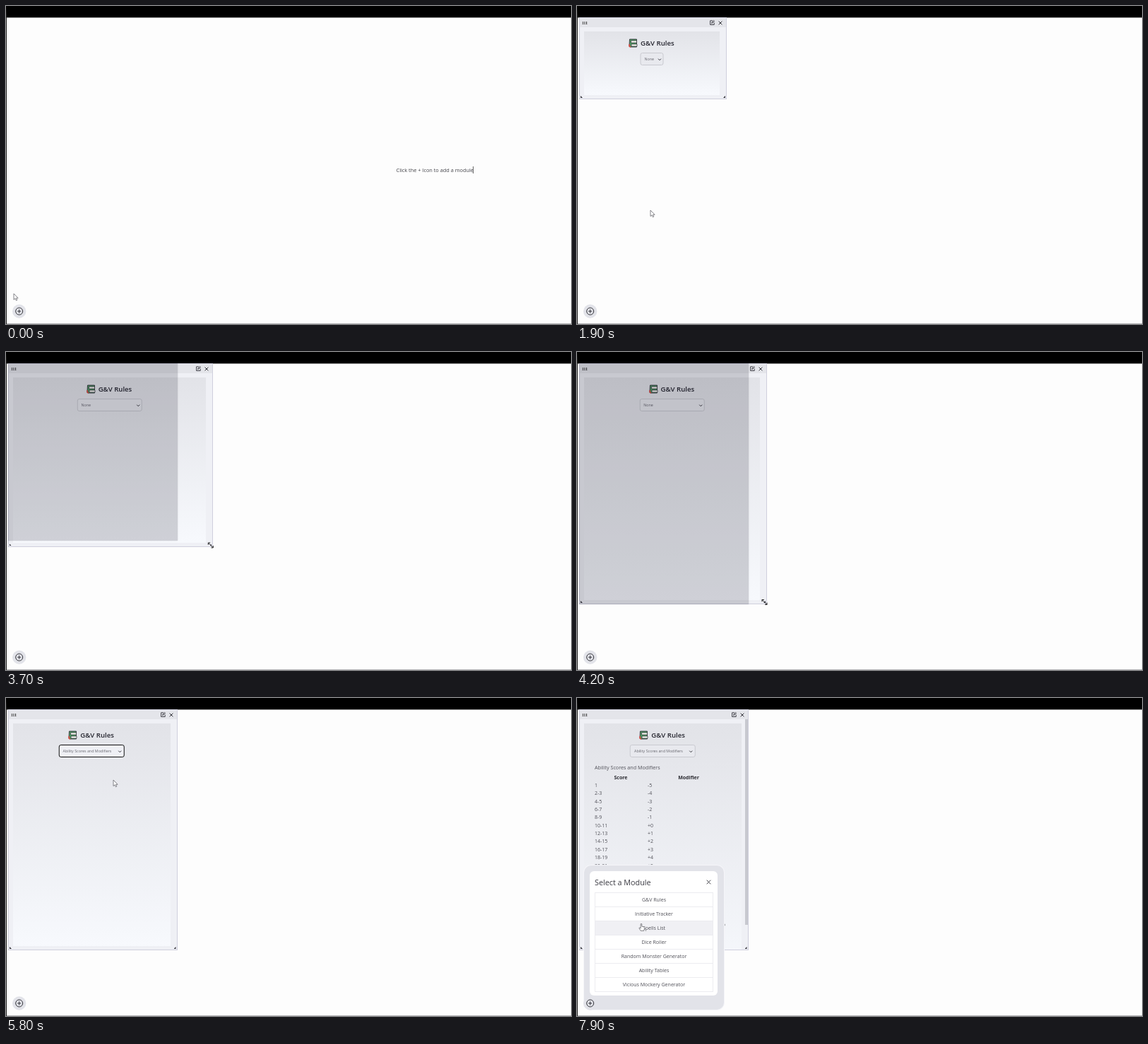
Animation of 800 by 450 pixels, one loop 8000 ms. Source, as an HTML page:

```html
<!DOCTYPE html>
<html lang="en">
<head>
<meta charset="utf-8">
<title>Module board</title>
<style>
html, body { margin: 0; width: 100%; height: 100%; overflow: hidden; background: #fdfdfd; }
#stage { position: absolute; left: 0; top: 0; width: 800px; height: 450px; overflow: hidden;
  background: #fdfdfd; font: 7px/12px "Open Sans", "Noto Sans", sans-serif; color: #505058; }
#stage, #stage * { box-sizing: border-box; }
#stage div, #stage svg { position: absolute; }
[hidden] { display: none !important; }
svg { overflow: visible; fill: none; stroke: #33333a; }
.text { white-space: nowrap; }

#frame { inset: 0; border: solid #222; border-width: 16px 0 0 1px; border-top-color: #000;
  box-shadow: inset 0 1px #999, inset 0 -1px #b5b5b8; }
#prompt { left: 552.5px; top: 226px; font-size: 7.35px; color: #44444a; }
#caret { left: 661px; top: 227px; width: 1px; height: 10px; background: #666; }

#win { left: 3px; top: 16px; border: 1px solid #cfcfdd; background: #eff0f5; overflow: hidden; }
#bar { left: 0; top: 0; right: 0; height: 13px; background: #e4e5ea; }
#grip { left: 3px; top: 4.5px; width: 8px; height: 4px;
  background: radial-gradient(circle, #444 0.7px, transparent 1px) 0 0 / 2.6px 2.2px; }
#edit { right: 16px; top: 3px; }
#close { right: 5px; top: 4px; }
#panel { left: 6px; right: 9px; top: 19px; bottom: 5px; background: linear-gradient(#e2e3e8, #f7f9fd); }
#panel.long { bottom: -45px; }
#title { left: 50%; top: 9px; width: 66px; height: 16px; margin-left: -33px; padding-left: 17px;
  font: 600 9.6px/16px "Open Sans", "Noto Sans", sans-serif; color: #24242e; }
#books { left: 0; top: 1px; }
#select { left: 50%; top: 30px; height: 18px; transform: translateX(-50%); padding-left: 5px;
  border: 1px solid #c9cad0; border-radius: 3px; background: #e8e9ee; color: #66666e;
  font-size: 5.35px; line-height: 17px; }
#select.focus { border: 1.5px solid #111; background: #eff0f5; padding-left: 4.5px; }
#arrow { right: 2.5px; top: 6.5px; }
#table { left: 15px; top: 0; }
#thumb { left: 234px; top: 13px; width: 4px; height: 291px; background: #c7c8cf; }
.corner { bottom: 1px; width: 3px; height: 3px; background: #33333b; }
#left { left: 1px; clip-path: polygon(0 0, 100% 100%, 0 100%); }
#right { right: 1px; clip-path: polygon(100% 0, 100% 100%, 0 100%); }
#ghost { left: 3px; top: 16px; width: 240px; background: rgba(8, 8, 24, 0.17);
  box-shadow: 0 0 2px rgba(0, 0, 0, 0.12); }

#list { left: 75px; top: 84px; width: 92px; height: 229px; background: #fff; border: 1px solid #888; font-size: 5.2px; }
#list div { width: 90px; height: 11.35px; line-height: 11px; padding-left: 4px; }
#list .on { background: #1e70d0; color: #fff; }

#menu { left: 10px; top: 237px; width: 198px; height: 204px; border-radius: 10px; background: #e2e3e9;
  box-shadow: 0 0 0 1px #f5f5f9; }
#card { left: 8px; top: 8px; width: 181px; height: 176px; border-radius: 6px; background: #fff; }
#head { left: 7px; top: 8px; font-size: 10.8px; line-height: 15px; color: #3a3a42; }
#dismiss { left: 164.5px; top: 11.5px; }
#items div { left: 7px; width: 168px; height: 21px; border: 1px solid #ececf0;
  line-height: 19px; text-align: center; font-size: 7.05px; }
#items .on { background: #f0f0f4; }
#plus { left: 9px; top: 422px; }
#cursor path { fill: #fff; stroke: #66666d; stroke-width: .8; }
#cursor #resize { fill: none; stroke: #222; stroke-width: 1; }
</style>
</head>
<body>
<div id="stage">
  <div id="frame"></div>
  <div class="text" id="prompt">Click the + Icon to add a module</div>
  <div id="caret"></div>

  <div id="win">
    <div id="panel">
      <div class="text" id="title">
        <svg id="books" width="13" height="13">
          <path d="M1.5 1h10v11h-9q-1.500 0-1.500-1.500z" fill="#4f9a62" stroke-width=".9"/>
          <path d="M3.500 3h8v3h-8zM4 8h8v3H4z" fill="#f4f6ee" stroke-width=".7"/>
          <path d="M1.200 8v3l1.800 1" stroke="#d8473d" stroke-width="1.600"/>
        </svg>G&amp;V Rules</div>
      <div class="text" id="select"><span id="value"></span>
        <svg id="arrow" width="5" height="4"><path d="M.5.7l2 2 2-2" stroke-width="1"/></svg></div>
      <div id="table"></div>
    </div>
    <div id="bar">
      <div id="grip"></div>
      <svg id="edit" width="7" height="7"><path d="M4 .8H.6v5.700h5.600V3.500M2.500 4.600l.3-1.300L5.700.5l.8.8-2.800 2.900z" stroke-width=".9"/></svg>
      <svg id="close" width="6" height="6"><path d="M.6.6l4.800 4.800M5.400.6L.6 5.400"/></svg>
    </div>
    <div id="thumb"></div>
    <div class="corner" id="left"></div>
    <div class="corner" id="right"></div>
  </div>
  <div id="ghost"></div>
  <div id="list"></div>

  <div id="menu">
    <div id="card">
      <div class="text" id="head">Select a Module</div>
      <svg id="dismiss" width="7" height="7"><path d="M.7.7l5.600 5.600M6.300.7L.7 6.300" stroke-width=".9"/></svg>
      <div id="items"></div>
    </div>
  </div>
  <svg id="plus" width="20" height="20">
    <circle cx="9.700" cy="10" r="9.700" fill="#e2e3e9" stroke="none"/>
    <circle cx="9.700" cy="10" r="5"/>
    <path d="M7.200 10h5M9.700 7.500v5"/>
  </svg>

  <svg id="cursor" width="1" height="1">
    <path id="pointer" d="M0 0v8.600l2-1.800 1.400 3 1.400-.7-1.300-2.800h2.600z"/>
    <path id="hand" d="M-.8.8Q0-.6.8.8V4.200l3 .8q.9.4.7 1.600l-.7 3.800H-.8L-3 6.800q0-1.200 1-.8l1.200 1z"/>
    <path id="resize" d="M-2-2.500L5 4.500M-2 .3v-2.800H.8M5 1.700v2.800H2.200"/>
  </svg>
</div>
<script>
const LOOP = 8000, STEP = 100;
const ADDED = 1700, GRAB = 3200, RELEASE = 4200, FILLED = 6000, REOPENED = 7000;
const $ = id => document.getElementById(id);

// Stops of the mouse: time, x, y
const stops = [
  [0, 11, 407], [400, 17, 432], [800, 17, 432], [1600, 105, 290], [1900, 104, 289],
  [2700, 96, 62], [2950, 255, 142], [GRAB, 207, 128], [3400, 236, 140], [3800, 298, 297],
  [RELEASE, 264, 353], [5000, 160, 77], [5800, 152, 116], [6900, 19, 431], [7400, 19, 431], [7900, 91, 319]
];
const topic = "Ability Scores and Modifiers";
const modules = ["G&V Rules", "Initiative Tracker", "Spells List", "Dice Roller",
  "Random Monster Generator", "Ability Tables", "Vicious Mockery Generator"];
const topics = ["None", topic, "Ability Checks", "Actions in Combat", "Advantage", "Armor", "Conditions",
  "Cover", "Damage Types", "Death Saves", "Difficulty Classes", "Equipment", "Exhaustion", "Falling",
  "Languages", "Light and Vision", "Resting", "Saving Throws", "Travel Pace", "Weapons"];
const notes = ["To find a modifier without using the table,",
  "subtract ten from the score, then divide the result by two", "and round down. Add the modifier to each",
  "roll or check that is made with that ability in the game."];

function add(parent, text, top, style = "") {
  const el = document.createElement("div");
  el.className = "text";
  el.textContent = text;
  el.style.cssText = `top:${top}px;${style}`;
  parent.append(el);
  return el;
}

const rows = modules.map((name, i) => add($("items"), name, 29.5 + i * 20));
const options = topics.map((name, i) => add($("list"), name, i * 11.35));

const table = $("table");
const bold = "font-weight:700;color:#2a2a30;transform:translateX(-50%);left:";
add(table, topic, 55.5, "font-size:7.2px");
add(table, "Score", 71, bold + "37px");
add(table, "Modifier", 71, bold + "133px");
for (let i = 0; i < 16; i++) {
  const low = Math.max(1, 2 * i), high = Math.min(30, 2 * i + 1);
  const top = 82 + i * 11.35;
  add(table, low === high ? low : `${low}-${high}`, top);
  add(table, (i < 5 ? "" : "+") + (i - 5), top, "left:75px");
}
notes.forEach((line, i) => add(table, line, 265 + i * 14));

const clamp = v => Math.min(1, Math.max(0, v));
const mix = (a, b, k) => a + (b - a) * k;
const smooth = k => k * k * (3 - 2 * k);
const within = (t, from, to) => t >= from && t < to;
const show = (id, on) => $(id).toggleAttribute("hidden", !on);

function mouseAt(t) {
  const i = Math.max(1, stops.findIndex(stop => stop[0] >= t));
  const [t0, x0, y0] = stops[i - 1], [t1, x1, y1] = stops[i];
  const k = smooth(clamp((t - t0) / (t1 - t0)));
  return [mix(x0, x1, k), mix(y0, y1, k)];
}

// The corner follows the mouse while dragged, then slides to the grid.
function cornerAt(t) {
  const [x, y] = mouseAt(Math.min(RELEASE, Math.max(GRAB, t)));
  return [mix(x + 5, 242.5, smooth(clamp((t - RELEASE) / 200))), y + 4];
}

function draw(t) {
  const [x, y] = mouseAt(t), [right, bottom] = cornerAt(t);
  const added = t >= ADDED, filled = t >= FILLED;
  const menu = within(t, 700, ADDED) || t >= REOPENED;

  show("prompt", !added);
  show("caret", !added && t % 1500 < 300);
  show("win", added);
  $("win").style.width = right - 3 + "px";
  $("win").style.height = bottom - 16 + "px";
  $("select").style.width = (right < 220 ? 33 : 92.5) + "px";
  $("select").classList.toggle("focus", within(t, 5100, 6900));
  $("value").textContent = t >= 5700 ? topic : "None";
  $("panel").classList.toggle("long", filled);
  show("table", filled);
  show("thumb", filled);

  show("ghost", within(t, GRAB + STEP, RELEASE + STEP));
  $("ghost").style.height = 116 + Math.round((bottom - 132) / 45) * 45 + "px";
  show("list", within(t, 5200, 5700));
  const option = Math.floor((y - 84) / 11.35);
  options.forEach((el, i) => el.classList.toggle("on", i === Math.max(0, option)));

  show("menu", menu);
  const row = menu && x > 25 ? Math.floor((y - 275) / 20) : -1;
  rows.forEach((el, i) => el.classList.toggle("on", i === row));

  const resizing = within(t, 3500, RELEASE + STEP);
  const hand = !resizing && (Math.hypot(x - 18.5, y - 432) < 9 || row in rows);
  show("resize", resizing);
  show("hand", hand);
  show("pointer", !resizing && !hand);
  $("cursor").style.transform = `translate(${x}px, ${y}px)`;
}

const start = performance.now();
function tick() {
  const t = (performance.now() - start) % LOOP;
  draw(Math.floor(t / STEP) * STEP);
  requestAnimationFrame(tick);
}
draw(0);
requestAnimationFrame(tick);
</script>
</body>
</html>
```
